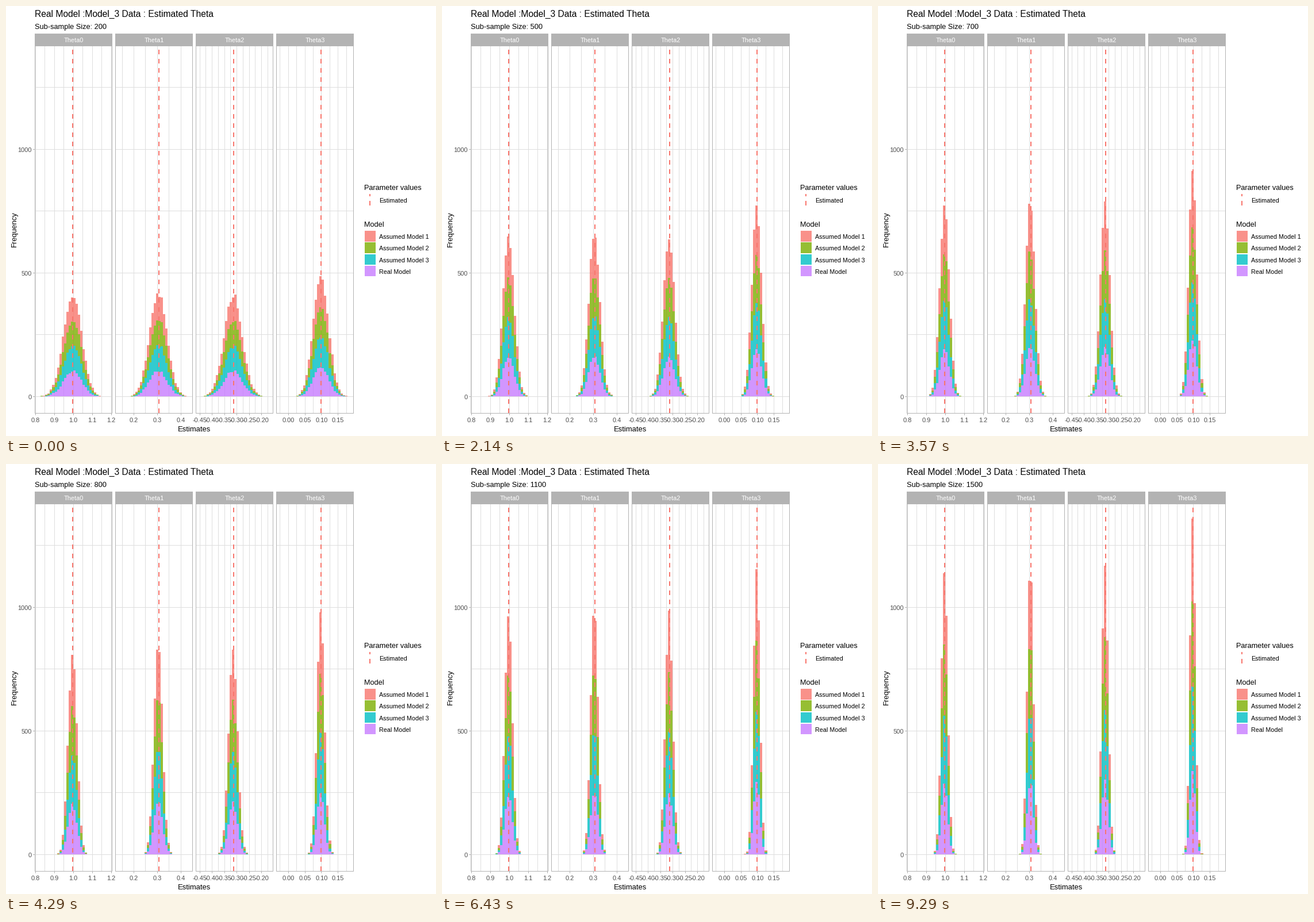
These frames come from a looping animation (748x748 px, 10000 ms). A matplotlib script:

```python
import numpy as np
import matplotlib.pyplot as plt
from matplotlib.animation import FuncAnimation
from matplotlib.patches import Rectangle

SIZE, DPI = 748, 100
PX = 72 / DPI                       # points per pixel
LOOP, TICK, STEPS = 10000, 50, 14
TOP, BOTTOM, ZERO, UNIT = 69, 708, 679.4, 0.43
LEFT, PANEL_W, PANEL_STEP = 50.63, 133.52, 140.1
BINS = 30
BIN_W = PANEL_W / 33
GREY, GRID, RED = "#b3b3b3", "#dedede", "#f8766d"

# Stack order from the baseline up
MODELS = [("Real Model", "#c77cff"), ("Assumed Model 3", "#00bfc4"),
          ("Assumed Model 2", "#7cae00"), ("Assumed Model 1", RED)]

# mean bin, spread, estimate x, first tick x, half tick step, tick labels
PANELS = [
    (14.19, 3170, 116, 51, 16.5, ["0.8", "0.9", "1.0", "1.1", "1.2"]),
    (16.47, 2942, 266, 222.5, 20.4, ["0.2", "0.3", "0.4"]),
    (13.98, 3130, 396, 337, 10.75,
     ["-0.45", "-0.40", "-0.35", "-0.30", "-0.25", "-0.20"]),
    (17.10, 2180, 548, 491.3, 14.4, ["0.00", "0.05", "0.10", "0.15"]),
]

plt.rcParams["font.family"] = "Liberation Sans"
fig = plt.figure(figsize=(SIZE / 100, SIZE / 100), dpi=DPI, facecolor="white")
ax = fig.add_axes([0, 0, 1, 1])
ax.set_xlim(0, SIZE)
ax.set_ylim(SIZE, 0)
ax.axis("off")


def mid(v):
    """Centre of the pixel that holds v."""
    return np.floor(v) + 0.5


def text(x, y, s, size, color="black", ha="left", **kw):
    return ax.text(x, y, s, fontsize=size * PX, color=color, ha=ha,
                   va="baseline", **kw)


def line(xs, ys, color=GREY, z=1):
    ax.plot(xs, ys, color=color, lw=PX, zorder=z, snap=False,
            solid_capstyle="butt")


def hline(y, x0, x1, color=GREY):
    line([x0, x1], [mid(y)] * 2, color)


def vline(x, y0, y1, color=GREY):
    line([mid(x)] * 2, [y0, y1], color)


def dashed(x, y0, y1):
    ax.plot([x, x], [y0, y1], color=RED, lw=2 * PX, zorder=4,
            linestyle=(0, (4, 4)), dash_capstyle="butt", snap=False)


def box(x, y, w, h, **kw):
    ax.add_patch(Rectangle((x, y), w, h, lw=0, zorder=5, **kw))


def counts(panel, n):
    """Histogram counts of the four models for sub-samples of size n."""
    mean, spread = PANELS[panel][:2]
    var = spread * (1 / n - 8e-5) + 1 / 12
    z2 = (np.arange(BINS) - mean) ** 2 / var
    base = 1000 * np.exp(-z2 / 2) / np.sqrt(2 * np.pi * var)
    rng = np.random.default_rng(10 * n + panel)
    noise = rng.normal(0, 0.35, (len(MODELS), BINS)) * np.sqrt(base)
    return np.round(np.maximum(base + noise, 0))


def draw_panel(p):
    _, _, est, first, half, labels = PANELS[p]
    x0 = LEFT + PANEL_STEP * p
    x1 = x0 + PANEL_W
    for v in range(0, 1251, 250):
        hline(ZERO - UNIT * v, x0, x1, GRID)
    for k in range(-1, 2 * len(labels)):
        x = first + half * k
        if x0 < x < x1:
            vline(x, TOP, BOTTOM, GRID)
    for k, label in enumerate(labels):
        x = first + 2 * half * k
        vline(x, BOTTOM + 1, BOTTOM + 4)
        text(x, 724, label, 11, "#4d4d4d", "center")
    dashed(est, BOTTOM, TOP)
    left, right, top, bottom = map(mid, (x0, x1, TOP, BOTTOM))
    line([left, right, right, left, left], [top, top, bottom, bottom, top],
         z=5)
    box(left - 0.5, 48, right - left + 1, TOP - 48, fc=GREY)
    text((x0 + x1) / 2, 63, f"Theta{p}", 10.9, "white", "center", zorder=6)
    edges = np.floor(x0 + BIN_W * (1.5 + np.arange(BINS + 1)))
    flat = np.full(BINS, ZERO)
    return [ax.stairs(flat, edges, baseline=flat, fill=True, color=c,
                      alpha=0.8, antialiased=False, zorder=3)
            for _, c in MODELS]


def draw_legend():
    text(623, 319.5, "Parameter values", 12.8)
    dashed(633, 347, 327)
    text(649, 341.5, "Estimated", 10.9)
    text(623, 384, "Model", 12.8)
    for i, (name, color) in enumerate(reversed(MODELS)):
        y = 391.3 + 20.16 * i
        box(623.9, y, 18.7, 18.7, fc=color, alpha=0.8)
        text(649, y + 14, name, 10.8)


stacks = [draw_panel(p) for p in range(len(PANELS))]
draw_legend()
for v in (0, 500, 1000):
    y = ZERO - UNIT * v
    hline(y, 47, 50)
    text(45, y + 4.5, str(v), 11, "#4d4d4d", "right")
text(50, 19, "Real Model :Model_3 Data : Estimated Theta", 15.6)
subtitle = text(50, 40, "", 12.8)
text(327.3, 740, "Estimates", 13, ha="center")
ax.text(20.5, 388.5, "Frequency", fontsize=13 * PX, rotation=90,
        ha="right", va="center")
ax.set_xlim(0, SIZE)
ax.set_ylim(SIZE, 0)


def show(step):
    n = 200 + 100 * step
    subtitle.set_text(f"Sub-sample Size: {n}")
    for p, layers in enumerate(stacks):
        low = np.full(BINS, ZERO)
        for patch, c in zip(layers, counts(p, n)):
            high = low - UNIT * c
            patch.set_data(values=high, baseline=low)
            low = high


def update(i):
    show(int((i * TICK + TICK - 1) * STEPS / LOOP))
    return []


anim = FuncAnimation(fig, update, frames=LOOP // TICK, interval=TICK,
                     init_func=lambda: update(0), repeat=True, repeat_delay=0,
                     blit=False)
plt.show()
```
